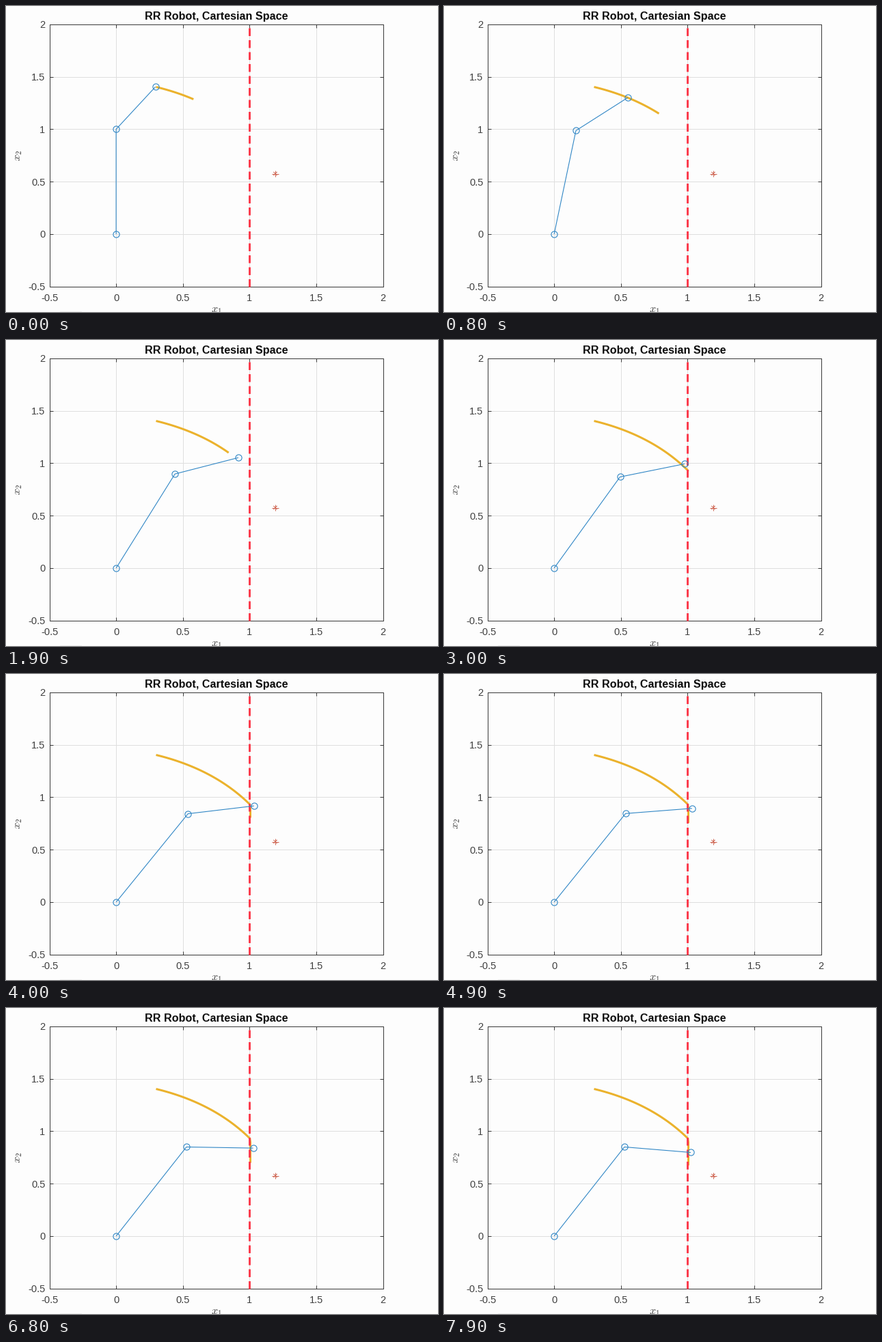
Animation, 632 px wide and 448 px high, one loop 8000 ms. Source, as a matplotlib script:

```python
import numpy as np
import matplotlib.pyplot as plt
from matplotlib.animation import FuncAnimation

W, H, DPI = 632, 448, 100
PX = 72 / DPI  # points per pixel
FRAMES, STEP = 80, 100

plt.rcParams["font.family"] = "Liberation Sans"
plt.rcParams["mathtext.fontset"] = "cm"

LEFT, RIGHT, TOP, BOTTOM = 63, 551, 26.3, 410.3
INK, TEXT = "#3a3a3a", "#404040"
BLUE, GOLD, RED = "#2f86c5", "#ebb22c", "#fb3d4e"


def sx(x):
    return LEFT + (x + 0.5) * (RIGHT - LEFT) / 2.5


def sy(y):
    return BOTTOM - (y + 0.5) * (BOTTOM - TOP) / 2.5


def hermite(t, keys):
    """Cubic through (time, value, slope) keys."""
    for (t0, a, m0), (t1, b, m1) in zip(keys, keys[1:]):
        if t <= t1:
            break
    d = t1 - t0
    u = (t - t0) / d
    return ((1 + 2 * u) * (1 - u) ** 2 * a + u * (1 - u) ** 2 * d * m0
            + u * u * (3 - 2 * u) * b + u * u * (u - 1) * d * m1)


# Link angles in degrees
SHOULDER = [(0, 90, 0), (0.8, 80.6, -20), (1.9, 63.85, -6), (3, 60.4, -3),
            (4, 57.4, -0.8), (5.8, 58.2, 0), (7.9, 58.2, 0)]
WRIST = [(0, 53.9, -5), (0.8, 39, -23), (1.9, 18.1, -7), (3, 14.4, -4.5),
         (4, 8.6, -4.5), (5.8, 3, -3.8), (7.9, -6, -4)]
# Height of the trail's tip, in pixels
TIP = [(0, 136, 45), (0.8, 157, 10), (1.9, 164.5, 12), (3, 192, 22),
       (4, 210, 11), (5.8, 222, 4.5), (7.9, 230, 3)]

# A bend up to the wall, then straight down along it
u = np.linspace(0, 1, 120)[:, None]
p0, p1, p2 = np.array([[219, 118], [303.5, 138.5], [356.3, 190.5]])
bend = (1 - u) ** 2 * p0 + 2 * u * (1 - u) * p1 + u ** 2 * p2
path = np.vstack([bend, [[357, 196], [357, 240]]])


def arm(t):
    a, b = np.radians([hermite(t, SHOULDER), hermite(t, WRIST)])
    x = np.cumsum([0, np.cos(a), 0.5 * np.cos(b)])
    y = np.cumsum([0, np.sin(a), 0.5 * np.sin(b)])
    return sx(x), sy(y)


def trail(t):
    tip = hermite(t, TIP)
    done = path[path[:, 1] < tip]
    end = [np.interp(tip, path[:, 1], path[:, 0]), tip]
    return np.vstack([done, end]).T


fig = plt.figure(figsize=(W / DPI, H / DPI), dpi=DPI, facecolor="#fdfdfd")
ax = fig.add_axes([0, 0, 1, 1])
ax.set_xlim(-0.5, W - 0.5)
ax.set_ylim(H - 0.5, -0.5)
ax.axis("off")


def line(xs, ys, color, width=1.0, **kw):
    kw.setdefault("solid_capstyle", "butt")
    return ax.plot(xs, ys, color=color, lw=width * PX, **kw)[0]


def label(x, y, s, size, **kw):
    kw = {"color": TEXT, "ha": "center", "va": "baseline", **kw}
    ax.text(x, y, s, fontsize=size * PX, **kw)


# Grid, ticks and labels
for v in np.arange(-0.5, 2.1, 0.5):
    x, y = sx(v), sy(v)
    if -0.5 < v < 2:
        line([x, x], [TOP, BOTTOM], "#dfdfdf", zorder=1)
        line([LEFT, RIGHT], [y, y], "#dfdfdf", zorder=1)
    for edge, d in ((TOP, 5), (BOTTOM, -5)):
        line([x, x], [edge, edge + d], INK, zorder=2)
    for edge, d in ((LEFT, 5), (RIGHT, -5)):
        line([edge, edge + d], [y, y], INK, zorder=2)
    label(x, 431, f"{v:g}", 14.6)
    label(57, y + 5.3, f"{v:g}", 14.6, ha="right")

line([LEFT, RIGHT, RIGHT, LEFT, LEFT], [TOP, TOP, BOTTOM, BOTTOM, TOP],
     INK, zorder=2, solid_joinstyle="miter")
label(307.3, 19.7, "RR Robot, Cartesian Space", 16.1, weight="bold",
      color="#0c0c0c")
label(307, 448, "$x_1$", 16)
label(18, 218, "$x_2$", 16, rotation=90, va="center")
line([78, 110], [447, 447], "#efefef", 2, zorder=1)

# Star
for k in range(4):
    r = 3.7 if k % 2 else 4.6
    c, s = r * np.cos(k * np.pi / 4), r * np.sin(k * np.pi / 4)
    line([393.5 - c, 393.5 + c], [245 - s, 245 + s], "#cf6552", zorder=3)

# Wall
wall = line([355.8, 355.8], [BOTTOM, TOP], RED, 3, zorder=5,
            dash_capstyle="butt")
wall.set_linestyle((0, (11.5 / 3, 6 / 3)))

curve = line([], [], GOLD, 3, zorder=4, solid_joinstyle="round")
links = line([], [], BLUE, 1.1, zorder=6, marker="o", markersize=9.2 * PX,
             markerfacecolor="none", markeredgecolor=BLUE,
             markeredgewidth=1.1 * PX)


def draw(i):
    t = i * STEP / 1000
    curve.set_data(*trail(t))
    links.set_data(*arm(t))
    return curve, links


anim = FuncAnimation(fig, draw, frames=FRAMES, interval=STEP, repeat=True,
                     repeat_delay=0, blit=False)
plt.show()
```
